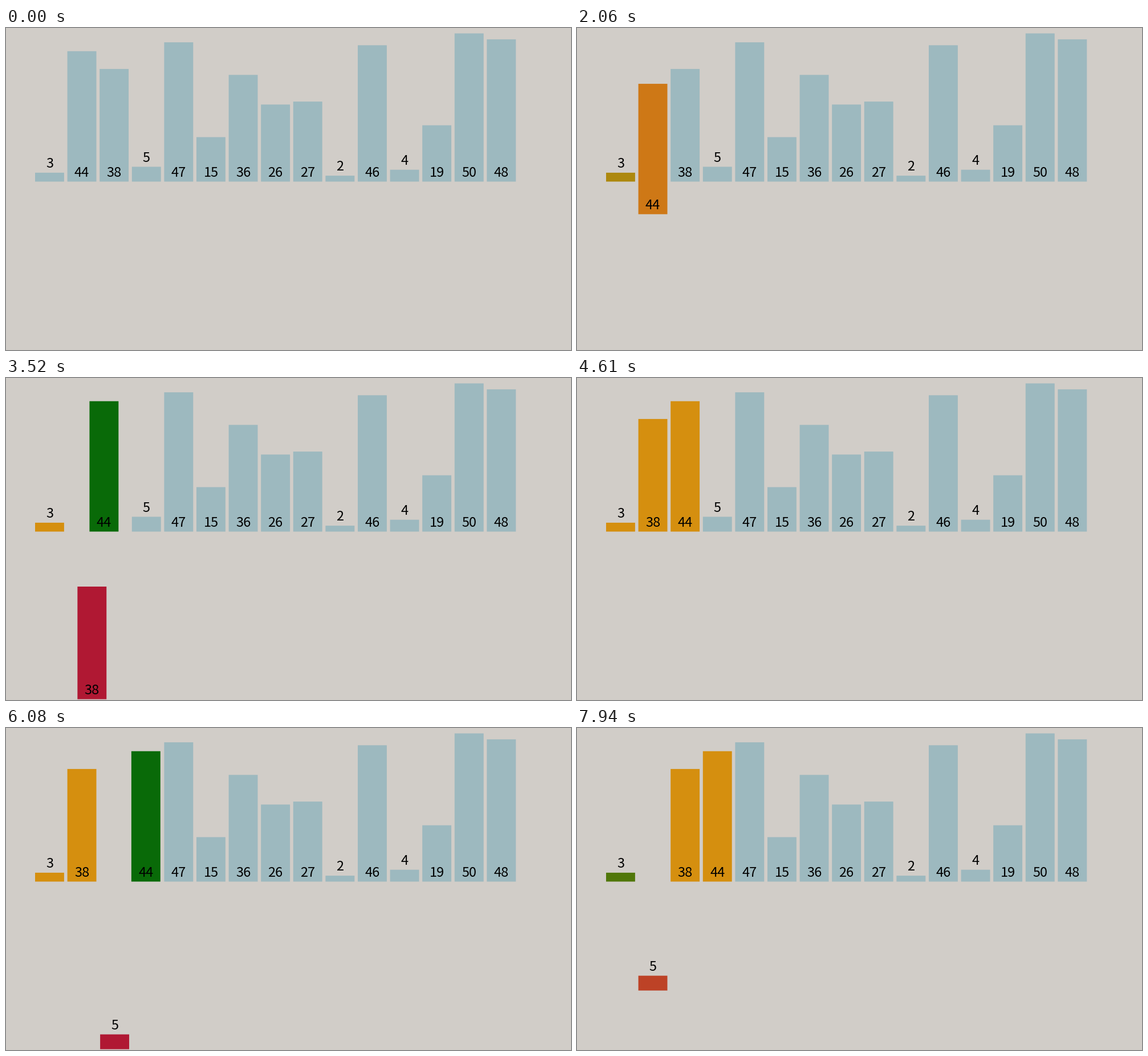
These frames come from a looping animation (991x565 px, 8 s). A matplotlib script:

```python
import numpy as np
import matplotlib.pyplot as plt
from matplotlib.animation import FuncAnimation
from matplotlib.patches import Rectangle

W, H, DPI = 991, 565, 64
LOOP, INTERVAL = 8000, 20

LEFT, STEP, BAR_W = 51, 56.6, 50.9
BASE, UNIT, DROP = 269.5, 5.2, 294.1
LABEL_GAP = 8.6

BACK = np.array([209, 205, 200]) / 255
BLUE = np.array([157, 185, 191]) / 255
ORANGE = np.array([213, 143, 15]) / 255
GREEN = np.array([9, 106, 8]) / 255
RED = np.array([176, 24, 51]) / 255

VALUES = [3, 44, 38, 5, 47, 15, 36, 26, 27, 2, 46, 4, 19, 50, 48]

# start in ms, phase reached at the second redraw (None: brief recolour),
# moves as (value, change in slot, change in row, new colour)
EVENTS = [
    (500, None, [(3, 0, 0, ORANGE)]),
    (960, 0.52, [(44, 0, 1, RED)]),
    (1510, None, [(3, 0, 0, GREEN)]),
    (1970, 0.635, [(44, 0, -1, ORANGE), (3, 0, 0, ORANGE)]),
    (2430, 0.47, [(38, 0, 1, RED)]),
    (2890, 0.44, [(44, 0, 0, GREEN)]),
    (3430, 0.572, [(44, 1, 0, GREEN), (38, -1, 0, RED)]),
    (3890, 0.44, [(44, 0, 0, ORANGE), (3, 0, 0, GREEN)]),
    (4370, 0.44, [(38, 0, -1, ORANGE), (3, 0, 0, ORANGE)]),
    (4900, 0.48, [(5, 0, 1, RED)]),
    (5390, 0.47, [(44, 0, 0, GREEN)]),
    (5930, 0.55, [(44, 1, 0, GREEN), (5, -1, 0, RED)]),
    (6390, 0.49, [(44, 0, 0, ORANGE), (38, 0, 0, GREEN)]),
    (6940, 0.713, [(38, 1, 0, GREEN), (5, -1, 0, RED)]),
    (7400, 0.57, [(38, 0, 0, ORANGE), (3, 0, 0, GREEN)]),
    (7860, 0.444, [(5, 0, -1, ORANGE), (3, 0, 0, ORANGE)]),
]
REDRAWS = (0, 83, 156, 230)


def ease(t):
    t = min(max(t, 0), 1)
    return 4 * t ** 3 if t < 0.5 else 1 - 4 * (1 - t) ** 3


def progress(age, phase):
    """Eased progress, held between the sparse redraws of a step."""
    if age < 0:
        return 0
    if phase is None:
        phases = (0.41, 1, 1, 1)
    else:
        phases = (phase - 0.33, phase, phase + 0.29, 1)
    held = sum(age >= r for r in REDRAWS) - 1
    return ease(phases[held])


def state(ms):
    bars = {v: (i, 0, BLUE) for i, v in enumerate(VALUES)}
    for start, phase, moves in EVENTS:
        p = progress(ms - start, phase)
        if p == 0:
            continue
        for v, dx, dy, colour in moves:
            slot, row, old = bars[v]
            bars[v] = (slot + dx * p, row + dy * p, old + (colour - old) * p)
    return bars


fig = plt.figure(figsize=(W / DPI, H / DPI), dpi=DPI, facecolor=BACK)
ax = fig.add_axes([0, 0, 1, 1])
ax.set_xlim(0, W)
ax.set_ylim(H, 0)
ax.axis("off")

rects, labels = {}, {}
for v in VALUES:
    rects[v] = ax.add_patch(Rectangle((0, 0), BAR_W, v * UNIT, lw=0, snap=False))
    labels[v] = ax.text(0, 0, str(v), color="black", ha="center", va="baseline",
                        family="Noto Sans CJK JP", size=23.6 * 72 / DPI, zorder=3)


def draw(n):
    for v, (slot, row, colour) in state((n + 0.5) * INTERVAL).items():
        x = LEFT + STEP * slot
        bottom = BASE + DROP * row
        top = bottom - v * UNIT
        rects[v].set_xy((x, top))
        rects[v].set_facecolor(colour)
        # short bars carry their number above, tall ones inside
        foot = top if v <= 5 else bottom
        labels[v].set_position((x + BAR_W / 2, foot - LABEL_GAP))
    return [*rects.values(), *labels.values()]


anim = FuncAnimation(fig, draw, frames=LOOP // INTERVAL, interval=INTERVAL,
                     init_func=lambda: draw(0), repeat=True, repeat_delay=0)
plt.show()
```
